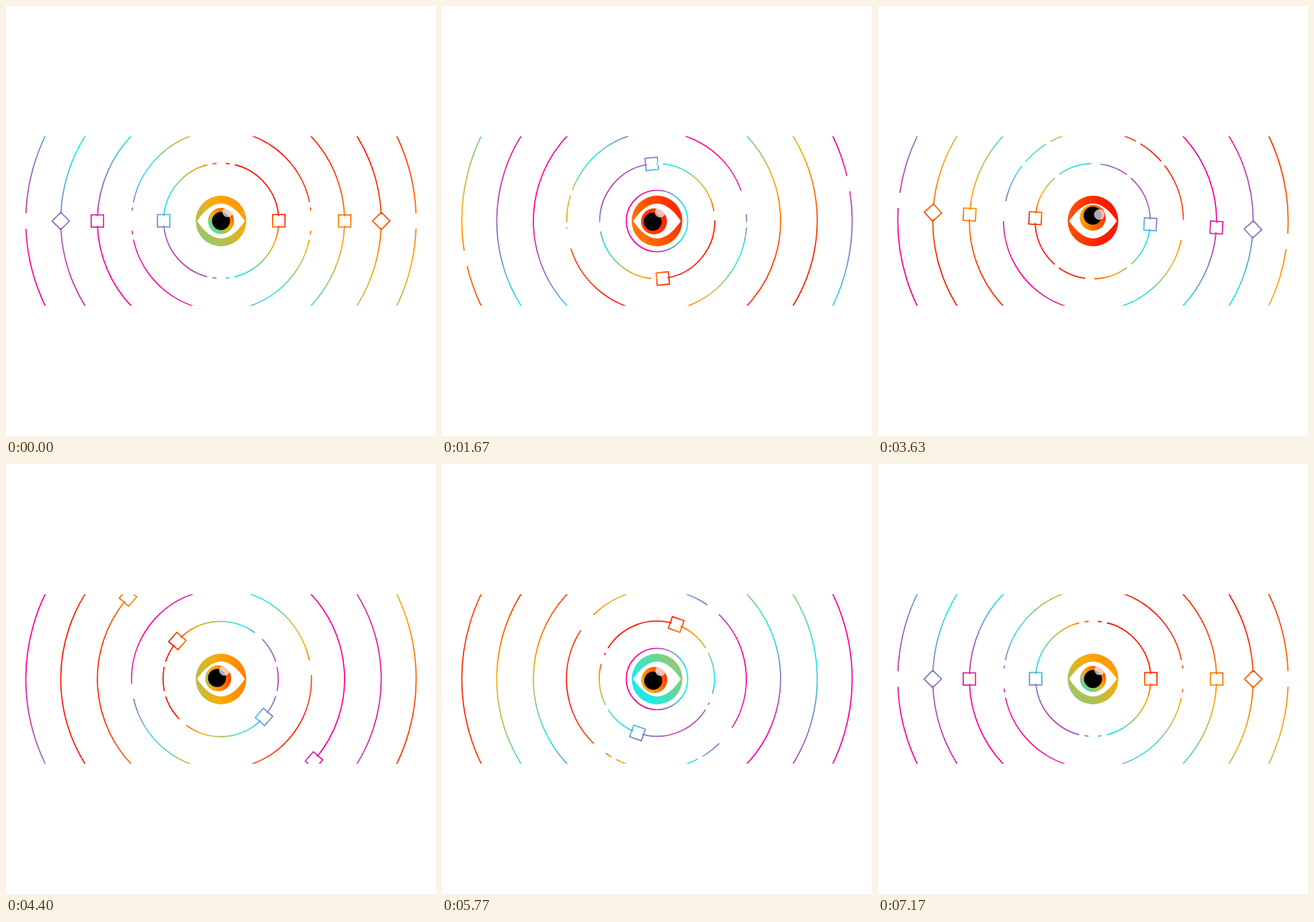
An HTML page with a canvas for the animation above (7210 ms loop, 640 by 640 pixels).

```html
<!DOCTYPE html>
<html lang="en">
<head>
<meta charset="utf-8">
<title>Watching eye</title>
<style>
  html, body { margin: 0; width: 100%; height: 100%; overflow: hidden; background: #fff; }
  canvas { display: block; width: 640px; height: 640px; }
</style>
</head>
<body>
<canvas id="stage" width="640" height="640"></canvas>
<script>
const ctx = document.getElementById('stage').getContext('2d');
const LOOP = 7210, TURN = 7170, STEPS = 179, TAU = Math.PI * 2;
const rad = deg => deg * Math.PI / 180;
const lerp = (a, b, k) => a + (b - a) * k;
const clamp = (v, lo, hi) => Math.min(hi, Math.max(lo, v));
const smooth = k => k * k * (3 - 2 * k);

// red, amber, cyan, magenta
const COLORS = [[255, 24, 0], [255, 170, 0], [20, 238, 240], [255, 0, 153]];
const rgb = c => `rgb(${c.map(Math.round).join(',')})`;

// tint shifts the colours along the axis, drift moves the centre to the red side,
// gap and side are half widths in px of the breaks at 0/180 and 90/270 degrees,
// mark is the tilt of the two squares
const RINGS = [
  { r: 85.7, turns: 1, tint: -.2, drift: .5, gap: 7, side: 7, mark: 0 },
  { r: 133.9, turns: 2, tint: .04, drift: .9, gap: 15, side: 11.2 },
  { r: 184, turns: 1, tint: .2, drift: 0, gap: 7, mark: 0 },
  { r: 238.5, turns: 1, tint: -.07, drift: 0, gap: 10, mark: 45 },
  { r: 290.5, turns: 2, tint: .16, drift: 0, gap: 11.5 }
];

// key poses of the eye: step, pupil x, pupil y, disc tone, iris tone
const POSES = [
  [0, 0, 0, 1.15, 1.05],
  [42, -6.5, 1, .38, .2],
  [71, 0, -4, .12, .6],
  [91, -.5, -8, .12, .6],
  [129, -11.5, 5, 1.85, 1.05],
  [159, 0, 0, 1.65, .25],
  [STEPS, 0, 0, 1.15, 1.05]
];

function pose(step) {
  const n = Math.max(1, POSES.findIndex(p => p[0] >= step));
  const a = POSES[n - 1], b = POSES[n];
  const k = smooth((step - a[0]) / (b[0] - a[0]));
  return a.map((v, j) => lerp(v, b[j], k)).slice(1);
}

// cubic-bezier(1, 0, .667, 1)
function slowStart(x) {
  let lo = 0, hi = 1;
  for (let n = 0; n < 30; n++) {
    const s = (lo + hi) / 2, q = 1 - s;
    if (3 * q * q * s + 2 * q * s * s + s * s * s < x) lo = s; else hi = s;
  }
  return smooth((lo + hi) / 2);
}

function tone(s) {
  const v = clamp(s, 0, 2.999), n = Math.floor(v);
  return rgb(COLORS[n].map((c, j) => lerp(c, COLORS[n + 1][j], v - n)));
}

function circle(x, y, r) {
  ctx.beginPath();
  ctx.arc(x, y, r, 0, TAU);
}

function arc(r, from, to) {
  ctx.beginPath();
  ctx.arc(0, 0, r, from, to);
  ctx.stroke();
}

function ringPaint(r, tint) {
  const reach = 1.25, d = r * reach * Math.SQRT1_2;
  const g = ctx.createLinearGradient(d, -d, -d, d);
  const stops = [.95 + .6 * tint, .47 + .4 * tint, tint - .25, tint - 1];
  stops.forEach((c, n) => g.addColorStop((reach - c) / (2 * reach), rgb(COLORS[n])));
  return g;
}

function drawRing({ r, turns, tint, drift, gap, side = 0, mark }, u) {
  ctx.save();
  ctx.rotate(TAU * turns * u);
  ctx.translate(drift * Math.SQRT1_2, -drift * Math.SQRT1_2);
  ctx.strokeStyle = ringPaint(r, tint);
  for (const start of [0, Math.PI]) {
    const mid = start + Math.PI / 2, end = start + Math.PI;
    if (side) {
      arc(r, start + gap / r, mid - side / r);
      arc(r, mid + side / r, end - gap / r);
    } else {
      arc(r, start + gap / r, end - gap / r);
    }
  }
  if (mark !== undefined) {
    for (const x of [-r, r]) {
      ctx.beginPath();
      for (let n = 0; n < 4; n++) {
        const a = rad(mark + 45 + 90 * n);
        ctx.lineTo(x + 13 * Math.cos(a), 13 * Math.sin(a));
      }
      ctx.closePath();
      ctx.stroke();
    }
  }
  ctx.restore();
}

// small breaks that travel against each other
function drawCuts(r, angles) {
  ctx.save();
  ctx.strokeStyle = '#fff';
  ctx.lineWidth = 4.5;
  for (const a of angles) arc(r, rad(a) - 4 / r, rad(a) + 4 / r);
  ctx.restore();
}

// gradient across a disc, from low tones on the given side to high ones
function tonePaint(x, y, r, mid, span, angle) {
  const dx = Math.cos(angle) * r, dy = Math.sin(angle) * r;
  const g = ctx.createLinearGradient(x + dx, y + dy, x - dx, y - dy);
  for (let k = 0; k <= 1; k += .125) g.addColorStop(k, tone(mid + span * (k - .5)));
  return g;
}

function toneDisc(x, y, r, mid, span, angle) {
  ctx.fillStyle = tonePaint(x, y, r, mid, span, angle);
  circle(x, y, r);
  ctx.fill();
}

function lens() {
  ctx.beginPath();
  for (const s of [1, -1]) {
    ctx.lineTo(-35.5 * s, 0);
    ctx.bezierCurveTo(-24 * s, -17 * s, -12 * s, -26 * s, 0, -26 * s);
    ctx.bezierCurveTo(12 * s, -26 * s, 24 * s, -17 * s, 35.5 * s, 0);
  }
}

// a halo that grows out of the eye and shrinks back
function drawHalo(step, from, to) {
  const open = clamp(Math.min(step - from, to - step) / 10, 0, 1);
  if (!open) return;
  const r = lerp(36, 45.6, open);
  const g = ctx.createLinearGradient(-r, 0, r, 0);
  g.addColorStop(.35, rgb(COLORS[3]));
  g.addColorStop(.97, rgb(COLORS[2]));
  ctx.strokeStyle = g;
  circle(0, 0, r);
  ctx.stroke();
}

function drawEye(step, u) {
  const [px, py, disc, iris] = pose(step);
  const angle = -rad(50) * Math.cos(Math.PI * u) ** 2;

  toneDisc(0, 0, 37.7, disc, .58, angle);
  drawHalo(step, 30, 63);
  drawHalo(step, 126, 172);

  ctx.save();
  lens();
  ctx.fillStyle = '#fff';
  ctx.fill();
  ctx.clip();
  toneDisc(px * .7, py * .6, 19.4, iris, iris * 1.35, angle);
  ctx.fillStyle = '#000';
  circle(px, py, 13.4);
  ctx.fill();
  ctx.fillStyle = 'rgba(255,255,255,.68)';
  circle(9.8 + px * .8, -13.5 + Math.abs(py) * .5, 7.8);
  ctx.fill();
  ctx.restore();
}

function draw(ms) {
  const step = Math.min(STEPS, Math.round(ms * STEPS / TURN));
  const u = step / STEPS, swing = -360 * slowStart(u);

  ctx.fillStyle = '#fff';
  ctx.fillRect(0, 0, 640, 640);
  ctx.save();
  ctx.beginPath();
  ctx.rect(28, 194, 584, 252);
  ctx.clip();
  ctx.translate(320, 320);
  ctx.lineWidth = 1.8;

  RINGS.forEach(ring => drawRing(ring, u));
  const near = swing + 11.15, pair = 10.3;
  drawCuts(RINGS[0].r, [90 + near, 270 + near, 90 - near, 270 - near]);
  drawCuts(RINGS[1].r, [swing - pair, swing + pair, 180 - swing - pair, 180 - swing + pair]);
  drawEye(step, u);
  ctx.restore();
}

function tick(now) {
  draw(now % LOOP);
  requestAnimationFrame(tick);
}
draw(0);
requestAnimationFrame(tick);
</script>
</body>
</html>
```
